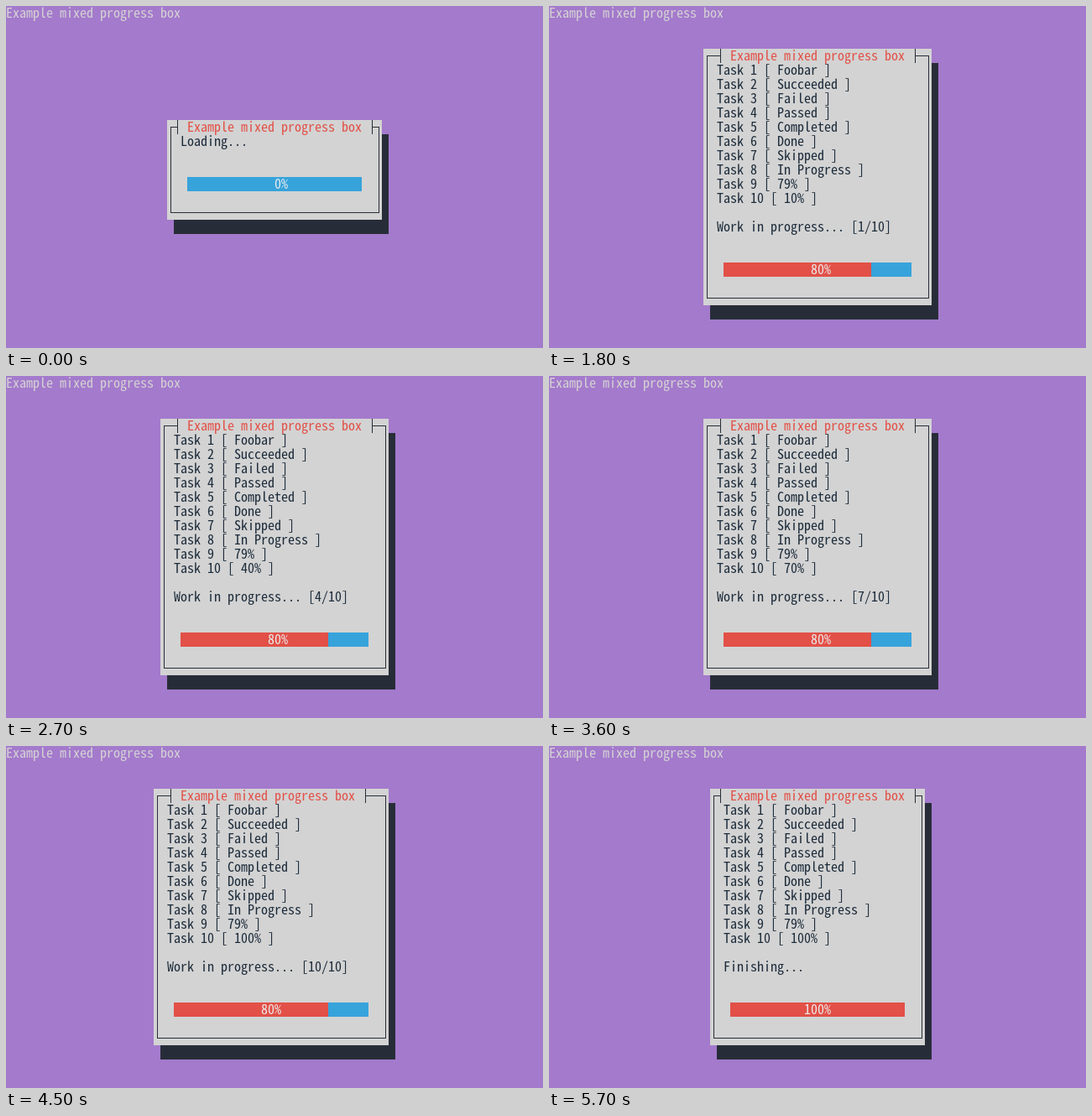
These frames come from a looping animation (640x408 px, 7 s). An HTML page with a canvas:

```html
<!DOCTYPE html>
<html lang="en">
<head>
<meta charset="utf-8">
<title>Mixed progress box</title>
<style>
  html, body { margin: 0; width: 100%; height: 100%; overflow: hidden; background: #a47acc; }
  canvas { display: block; }
</style>
</head>
<body>
<canvas id="stage" width="640" height="408"></canvas>
<script>
const ctx = document.getElementById("stage").getContext("2d", { alpha: false });
const LOOP = 7000, CELL_W = 8, CELL_H = 17, BASELINE = 14;
const FAMILY = "'Noto Sans Mono CJK JP', 'Noto Sans Mono CJK SC', 'Noto Sans Mono', monospace";
const TITLE = "Example mixed progress box";
const STATES = ["Foobar", "Succeeded", "Failed", "Passed", "Completed",
  "Done", "Skipped", "In Progress", "79%"];
const COLOR = {
  screen: "#a47acc", panel: "#d3d3d3", shadow: "#272d38", ink: "#1c2b3a",
  line: "#272d38", red: "#e25047", blue: "#37a3db", light: "#ececec"
};

// Font size at which one character is as wide as a cell.
function cellFont() {
  ctx.font = `100px ${FAMILY}`;
  const size = 100 * CELL_W / ctx.measureText("0").width;
  return `${size.toFixed(3)}px ${FAMILY}`;
}

// All positions are terminal cells.
function fillCells(col, row, cols, rows, color) {
  ctx.fillStyle = color;
  ctx.fillRect(col * CELL_W, row * CELL_H, cols * CELL_W, rows * CELL_H);
}

function print(text, col, row, color) {
  ctx.fillStyle = color;
  ctx.fillText(text, col * CELL_W, row * CELL_H + BASELINE);
}

function drawFrame(col, row, cols, rows, titleCol, titleCols) {
  const midX = c => c * CELL_W + 4, midY = r => r * CELL_H + 8;
  const left = midX(col), right = midX(col + cols - 1);
  const top = midY(row), bottom = midY(row + rows - 1);
  const teeLeft = midX(titleCol - 1), teeRight = midX(titleCol + titleCols);
  ctx.fillStyle = COLOR.line;
  ctx.fillRect(left, top, 1, bottom - top + 1);
  ctx.fillRect(right, top, 1, bottom - top + 1);
  ctx.fillRect(left, bottom, right - left + 1, 1);
  ctx.fillRect(left, top, teeLeft - left, 1);
  ctx.fillRect(teeRight, top, right - teeRight, 1);
  ctx.fillRect(teeLeft, row * CELL_H, 1, CELL_H);
  ctx.fillRect(teeRight, row * CELL_H, 1, CELL_H);
}

function drawBar(col, row, cols, percent) {
  fillCells(col, row, cols, 1, COLOR.blue);
  fillCells(col, row, Math.floor(cols * percent / 100), 1, COLOR.red);
  const label = percent + "%";
  print(label, col + Math.floor((cols - 4) / 2) + 4 - label.length, row, COLOR.light);
}

function drawDialog({ col, row, cols, rows, lines, percent }) {
  fillCells(col + 1, row + 1, cols, rows, COLOR.shadow);
  fillCells(col, row, cols, rows, COLOR.panel);
  const titleCols = TITLE.length + 2;
  const titleCol = col + Math.floor((cols - titleCols) / 2);
  drawFrame(col, row, cols, rows, titleCol, titleCols);
  print(TITLE, titleCol + 1, row, COLOR.red);
  lines.forEach((line, i) => print(line, col + 2, row + 1 + i, COLOR.ink));
  drawBar(col + 3, row + rows - 3, cols - 6, percent);
}

function taskDialog(col, cols, done, message, percent) {
  const lines = [...STATES, done * 10 + "%"].map((state, i) => `Task ${i + 1} [ ${state} ]`);
  return { col, row: 3, cols, rows: 18, lines: [...lines, "", message], percent };
}

function dialogAt(t) {
  if (t < 1300) {
    return { col: 24, row: 8, cols: 32, rows: 7, lines: ["Loading..."], percent: 0 };
  }
  if (t < 1800) return taskDialog(24, 32, 0, "Starting...", 80);
  if (t < 4800) {
    const done = 1 + Math.floor((t - 1800) / 300);
    const message = `Work in progress... [${done}/10]`;
    const cols = message.length + 8;
    return taskDialog(Math.floor((80 - cols) / 2), cols, done, message, 80);
  }
  const dots = Math.min(3, Math.floor((t - 4800) / 300));
  return taskDialog(24, 32, 10, "Finishing" + ".".repeat(dots), 100);
}

function draw(t) {
  fillCells(0, 0, 80, 24, COLOR.screen);
  print(TITLE, 0, 0, COLOR.panel);
  drawDialog(dialogAt(t));
}

let start;
function tick(now) {
  start ??= now;
  draw((now - start) % LOOP);
  requestAnimationFrame(tick);
}
ctx.font = cellFont();
draw(0);
requestAnimationFrame(tick);
</script>
</body>
</html>
```
